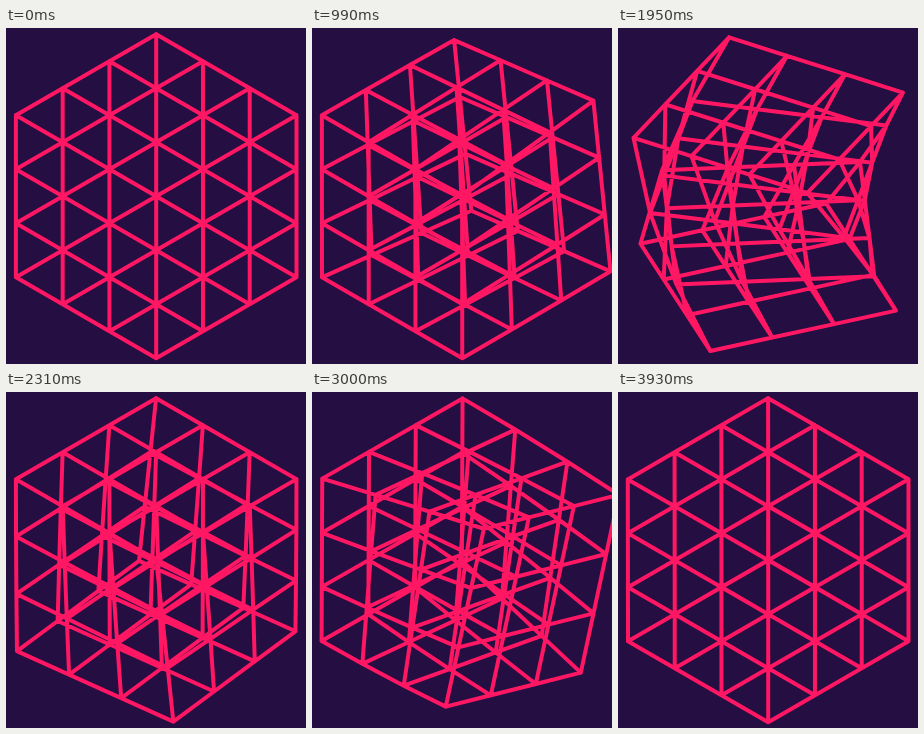
Animation, 300 px wide and 336 px high, one loop 3960 ms. Source, as an HTML page with a canvas:

```html
<!DOCTYPE html>
<html lang="en">
<head>
<meta charset="utf-8">
<title>Twisting wire cube</title>
<style>
  html, body { margin: 0; width: 100%; height: 100%; overflow: hidden; background: #250e42; }
  canvas { display: block; width: 300px; height: 336px; }
</style>
</head>
<body>
<canvas id="stage" width="300" height="336"></canvas>
<script>
const ctx = document.getElementById('stage').getContext('2d');
const LOOP = 3960, TURN = LOOP / 3, STEP = 30;
const CELLS = 3, HALF = 99.2;
const SX = Math.SQRT1_2, SY = Math.sqrt(1 / 6), SZ = Math.sqrt(2 / 3);

// Share of the quarter turn done by the leading and the trailing face: [ms, share]
const LEAD = [[0, 0], [120, .007], [240, .054], [360, .175], [480, .402], [630, .82],
  [780, .975], [900, .997], [1050, 1], [TURN, 1]];
const TRAIL = [[0, 0], [240, 0], [360, .003], [480, .047], [630, .271], [780, .66],
  [900, .85], [990, .922], [1140, .98], [1290, .999], [TURN, 1]];

// Monotone cubic interpolation through a table
function curve(table) {
  const slope = i => (table[i + 1][1] - table[i][1]) / (table[i + 1][0] - table[i][0]);
  const tangent = i => {
    if (i === 0 || i === table.length - 1) return 0;
    const a = slope(i - 1), b = slope(i);
    return a * b > 0 ? 2 * a * b / (a + b) : 0;
  };
  return t => {
    let i = 0;
    while (i < table.length - 2 && t >= table[i + 1][0]) i++;
    const [t0, v0] = table[i], [t1, v1] = table[i + 1];
    const d = t1 - t0, u = (t - t0) / d, w = 1 - u;
    return v0 * (1 + 2 * u) * w * w + v1 * u * u * (3 - 2 * u)
      + d * u * w * (tangent(i) * w - tangent(i + 1) * u);
  };
}
const lead = curve(LEAD), trail = curve(TRAIL);

// Every line of the solid lattice, inside and out
const lines = [];
for (let axis = 0; axis < 3; axis++)
  for (let i = 0; i <= CELLS; i++)
    for (let j = 0; j <= CELLS; j++) {
      const line = [];
      for (let n = 0; n <= CELLS; n++) {
        const p = [];
        p[axis] = n;
        p[(axis + 1) % 3] = i;
        p[(axis + 2) % 3] = j;
        line.push(p.map(v => (2 * v / CELLS - 1) * HALF));
      }
      lines.push(line);
    }

// Turn a point with its layer, then view it along the cube's diagonal
function project(point, axis, from, to) {
  const p = point.slice(), a = (axis + 1) % 3, b = (axis + 2) % 3;
  const mix = (p[axis] / HALF + 1) / 2;
  const angle = (from + (to - from) * mix) * Math.PI / 2;
  const c = Math.cos(angle), s = Math.sin(angle);
  p[a] = point[a] * c - point[b] * s;
  p[b] = point[a] * s + point[b] * c;
  return [150.2 + (p[0] - p[1]) * SX, 168.2 + (p[0] + p[1]) * SY - p[2] * SZ];
}

function draw(time) {
  const axis = (Math.floor(time / TURN) + 1) % 3;
  const t = time % TURN, from = trail(t), to = lead(t);
  ctx.fillStyle = '#250e42';
  ctx.fillRect(0, 0, 300, 336);
  ctx.beginPath();
  for (const line of lines)
    line.forEach((p, i) => {
      const [x, y] = project(p, axis, from, to);
      if (i) ctx.lineTo(x, y); else ctx.moveTo(x, y);
    });
  ctx.strokeStyle = '#ff1764';
  ctx.lineWidth = 4;
  ctx.lineCap = ctx.lineJoin = 'round';
  ctx.stroke();
}

const start = performance.now();
function tick() {
  const time = (performance.now() - start) % LOOP;
  draw(Math.floor(time / STEP) * STEP);
  requestAnimationFrame(tick);
}
tick();
</script>
</body>
</html>
```
